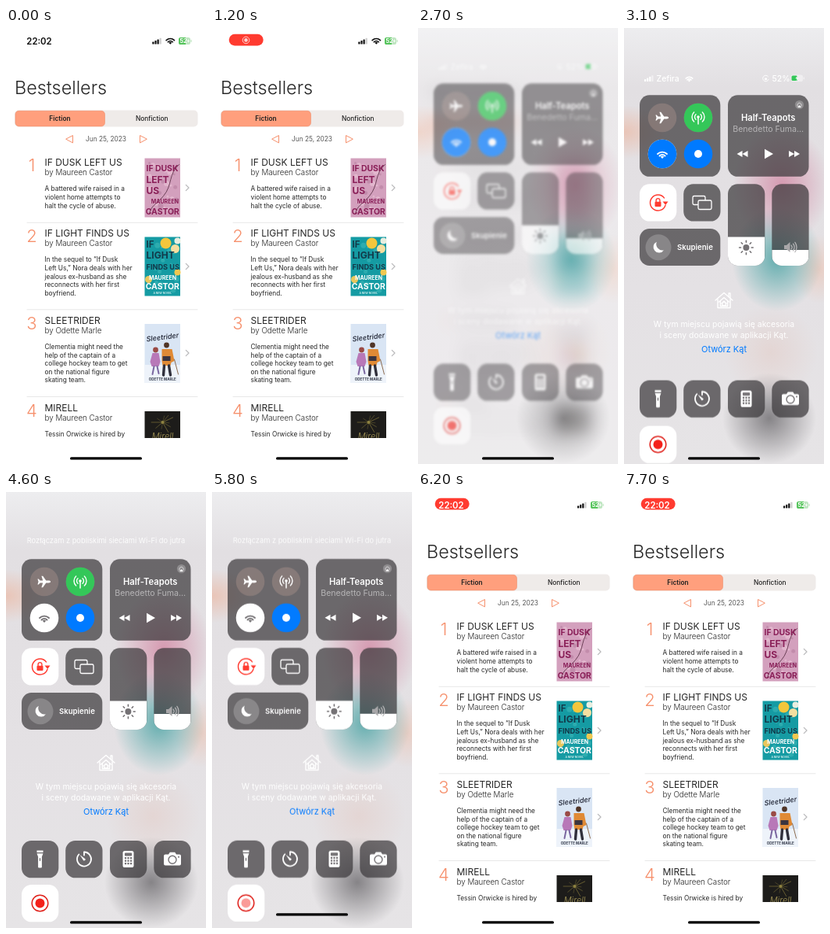
Write an HTML page that moves like this. It is 256x554 px and loops after 8 s.

```html
<!DOCTYPE html>
<html lang="en">
<head>
<meta charset="utf-8">
<title>Bestsellers</title>
<style>
html, body { margin: 0; width: 100%; height: 100%; overflow: hidden; background: #fff; }
svg, #backdrop { position: absolute; left: 0; top: 0; width: 256px; height: 554px; }
svg { font-family: Inter, Roboto, sans-serif; overflow: hidden; }
#backdrop {
  opacity: 0;
  background:
    radial-gradient(ellipse 55px 34px at 0 132px, rgba(240,170,140,.5), transparent),
    radial-gradient(ellipse 62px 75px at 202px 200px, rgba(205,110,145,.62), transparent),
    radial-gradient(ellipse 58px 66px at 196px 294px, rgba(40,150,150,.68), transparent),
    radial-gradient(ellipse 34px 44px at 250px 306px, rgba(236,190,170,.55), transparent),
    radial-gradient(ellipse 60px 60px at 188px 412px, rgba(225,190,180,.35), transparent),
    radial-gradient(ellipse 60px 58px at 186px 496px, rgba(70,68,72,.6), transparent),
    linear-gradient(#ededef, #e2dfe2 75px, #e4e1e4 330px, #e6e4e6);
}
</style>
</head>
<body>
<svg id="page" viewBox="0 0 256 554"></svg>
<div id="backdrop"></div>
<svg id="panel" viewBox="0 0 256 554"></svg>
<svg id="bar" viewBox="0 0 256 554"></svg>
<script>
const $ = id => document.getElementById(id);
const text = (x, y, s, size, weight = 400, fill = '#222', anchor = 'start', more = '') =>
  `<text x="${x}" y="${y}" font-size="${size}" font-weight="${weight}" fill="${fill}" text-anchor="${anchor}" ${more}>${s}</text>`;
const rect = (x, y, w, h, r, fill, more = '') =>
  `<rect x="${x}" y="${y}" width="${w}" height="${h}" rx="${r}" fill="${fill}" ${more}/>`;
const dot = (x, y, r, fill, more = '') => `<circle cx="${x}" cy="${y}" r="${r}" fill="${fill}" ${more}/>`;
const line = (d, color, w = 1, more = '') =>
  `<path d="${d}" fill="none" stroke="${color}" stroke-width="${w}" stroke-linecap="round" stroke-linejoin="round" ${more}/>`;
const shape = (d, fill) => `<path d="${d}" fill="${fill}"/>`;
const at = (x, y, s, k = 1) => `<g transform="translate(${x} ${y}) scale(${k})">${s}</g>`;
const group = (id, s, more = '') => `<g id="${id}" ${more}>${s}</g>`;
const arc = (r, from, to) => {
  const p = a => [r * Math.cos(a * Math.PI / 180), r * Math.sin(a * Math.PI / 180)].map(v => v.toFixed(2)).join(' ');
  return `M${p(from)}A${r} ${r} 0 ${to - from > 180 ? 1 : 0} 1 ${p(to)}`;
};

// Small icons
const bars = (x, y, on, off) => [0, 1, 2, 3].map(i =>
  rect(x + i * 3.1, y - 3 - i * 1.6, 2.2, 3 + i * 1.6, .6, i < 3 ? on : off)).join('');
const wifi = (x, y, fill, k = 1) => at(x, y,
  shape('M0 0L-2 -2.1A3 3 0 0 1 2 -2.1Z', fill) +
  [4.3, 7.3].map(r => line(arc(r, -135, -45), fill, 1.7, 'stroke-linecap="butt"')).join(''), k);
const bolt = (x, y, fill) => at(x, y, shape('M1 -3.4L-2 .5H0L-.8 3.4L2.2 -.6H.2Z', fill));
const battery = (x, y) =>
  rect(x, y, 15, 9, 2.6, '#bfe6c1') + shape(`M${x + 2.6} ${y}h6.4v9h-6.4a2.6 2.6 0 0 1-2.6-2.6v-3.8a2.6 2.6 0 0 1 2.6-2.6z`, '#55c45b') +
  rect(x + 15.5, y + 3, 1.2, 3, .6, '#bfe6c1') +
  text(x + 1.5, y + 7.1, '52', 7.4, 700, '#fff') + at(x + 12.3, y + 4.5, bolt(0, 0, '#fff'), .8);

// Book list
const INK = '#262626', PEACH = '#f6906c';
const books = [
  { y: 165, name: 'IF DUSK LEFT US', by: 'Maureen Castor',
    about: ['A battered wife raised in a', 'violent home attempts to', 'halt the cycle of abuse.'] },
  { y: 255, name: 'IF LIGHT FINDS US', by: 'Maureen Castor',
    about: ['In the sequel to “If Dusk', 'Left Us,” Nora deals with her', 'jealous ex-husband as she', 'reconnects with her first', 'boyfriend.'] },
  { y: 365.5, name: 'SLEETRIDER', by: 'Odette Marle',
    about: ['Clementia might need the', 'help of the captain of a', 'college hockey team to get', 'on the national figure', 'skating team.'] },
  { y: 476.5, name: 'MIRELL', by: 'Maureen Castor', about: ['Tessin Orwicke is hired by'] },
];
const row = ({ y, name, by, about }, i) =>
  text(33, y + 17, i + 1, 22, 300, PEACH, 'middle') +
  text(49.5, y + 10, name, 12, 400, INK) +
  text(49.5, y + 22.3, 'by ' + by, 9.8, 300, INK) +
  about.map((s, n) => text(49.5, y + 42.4 + n * 10.6, s, 8.3, 400, INK)).join('');

const PLUM = '#8a1f58', NAVY = '#123a4a';
const petals = (n, fill) => Array.from({ length: n }, (_, i) =>
  dot(6 + (i * 17.3) % 36, 6 + (i * 23.7) % 64, 1.5 + i % 3, fill, 'opacity=".55"')).join('');
const covers =
  at(177.5, 165.5,
    rect(0, 0, 45.5, 75, 0, '#d3a0bd') + petals(26, '#efc9da') + petals(9, '#a86a90') +
    line('M44 8C30 20 36 34 24 48S10 58 6 70', '#6d4258', 1) +
    text(2, 16, 'IF DUSK', 10.4, 700, PLUM) + text(2, 31, 'LEFT', 12, 700, PLUM) + text(2, 45, 'US', 12, 700, PLUM) +
    text(43.5, 57, 'MAUREEN', 7, 700, PLUM, 'end') + text(22.8, 71, 'CASTOR', 10.4, 700, PLUM, 'middle')) +
  at(177.5, 265.5,
    rect(0, 0, 45.5, 75, 0, '#159ba3') + petals(16, '#42b9ba') +
    dot(27, 8, 7, '#f3c63c') + dot(39, 15, 5.5, '#f5dfa0') + dot(42, 5, 4, '#e8eee0') + dot(5, 54, 4.5, '#e9c75c') + dot(42, 45, 4, '#f0c850') +
    text(2, 13, 'IF', 11.5, 700, NAVY) + text(2, 27.5, 'LIGHT', 12, 700, NAVY) + text(2, 41, 'FINDS US', 9.2, 700, NAVY) +
    text(23, 54, 'MAUREEN', 7, 700, '#fff', 'middle') + text(22.8, 66, 'CASTOR', 10.4, 700, '#fff', 'middle') +
    text(22.8, 72.5, 'A NEW NOVEL', 3.4, 600, '#d5f0ef', 'middle')) +
  at(177.5, 376,
    rect(0, 0, 45.5, 75, 0, '#d9e5f4') + rect(0, 52, 45.5, 23, 0, '#eef3fa') +
    dot(14, 33, 3.4, '#9a4a45') + shape('M10 37h8l2 11-2 6h-9l-2-6z', '#b878b8') + line('M12 54l-2 10M16 54l2 9', '#7a67a0', 2) +
    dot(28, 27, 3.4, '#503527') + shape('M22 32h13l3 15-4 2-1 4h-10l-1-6z', '#e08a35') + rect(23, 41, 10, 6, 0, '#3b3540') + line('M25 53l-1 12M31 53l2 12', '#30303c', 3.4) +
    line('M38 45L43 64', '#8b6a4f', 1) +
    text(23, 20, 'Sleetrider', 9, 500, '#1c2030', 'middle', 'font-style="italic" transform="rotate(-7 23 18)"') +
    text(22.8, 72, 'ODETTE MARLE', 4.5, 700, '#333a4a', 'middle')) +
  at(177.5, 487,
    rect(0, 0, 45.5, 75, 0, '#1d1c1a') +
    [-75, -50, -25, 5, 30, 60, 100, 140, 180, 215].map((a, i) =>
      line('M0 0L12 0', '#6d6334', .7, `transform="translate(23 14) rotate(${a}) scale(${.7 + i % 3 * .25})"`)).join('') +
    dot(23, 14, 2, '#8e8241') + text(23, 36, 'Mirell', 11, 300, '#a99a58', 'middle', 'font-style="italic"'));

$('page').innerHTML =
  '<clipPath id="view"><rect y="150" width="256" height="371"/></clipPath>' + rect(0, 0, 256, 554, 0, '#fff') +
  text(11, 84, 'Bestsellers', 23.4, 300, INK) +
  rect(11, 104.5, 234.5, 21, 5, '#efebe9') + rect(12, 105.3, 114.5, 19.6, 4.5, '#ff9f7d', 'stroke="#ee8e6c" stroke-width=".6"') +
  text(69, 118, 'Fiction', 8.4, 600, '#222', 'middle') + text(186.7, 118, 'Nonfiction', 8.4, 500, '#222', 'middle') +
  line('M77 141L85.5 136.5V145.5Z', PEACH) + line('M180 141L171.5 136.5V145.5Z', PEACH) +
  text(128, 144, 'Jun 25, 2023', 8.3, 400, '#555', 'middle') +
  `<g clip-path="url(#view)">${books.map(row).join('')}${covers}</g>` +
  [247.3, 357.8, 468.5].map(y => line(`M27 ${y}H245`, '#dedede', .7)).join('') +
  [203, 303, 413].map(y => line(`M230.3 ${y - 3.7}L234 ${y}L230.3 ${y + 3.7}`, '#b9b9bb', 1.2)).join('');

// Control panel
const TILE = 'rgba(60,57,60,.72)', W = '#fff', GREY = '#747174', RED = '#ff3b30', BLUE = '#007aff';
const tile = (x, y, w = 47.3, h = 47.3, fill = TILE) => rect(x, y, w, h, 12.5, fill);
const plane = shape('M9 0C9-1 8-1.6 6-1.6H2.5L-2-8h-2l2 6.4h-4l-2-2.4h-1.5l1.2 4-1.2 4H-8l2-2.4h4l-2 6.4h2l4.5-6.4H6c2 0 3-.6 3-1.6z', W);
const antenna = dot(0, -1, 1.8, W) + line('M0 0V8', W, 1.5) +
  [4.5, 8].map(r => at(0, -1, line(arc(r, -48, 48), W, 1.4) + line(arc(r, 132, 228), W, 1.4))).join('');
const skip = shape('M-7 -4L0 0L-7 4ZM0 -4L7 0L0 4Z', W);

const top_ = tile(20, 85.3, 103.3, 103.5) + tile(133, 85.3, 103.5, 103.5) +
  dot(49, 114, 18.3, 'rgba(190,160,150,.32)') + at(49, 114, plane, .9) +
  dot(95, 114, 18.3, 'rgba(190,160,150,.32)') + group('cell', dot(95, 114, 18.3, '#34c759')) + at(95, 114, antenna) +
  dot(49, 160, 18.3, W) + wifi(49, 166, GREY, 1.15) +
  group('wifiOn', dot(49, 160, 18.3, BLUE) + wifi(49, 166, W, 1.15)) +
  dot(95, 160, 18.3, BLUE) + dot(95, 160, 5, W) +
  dot(224.5, 97.5, 5.6, 'rgba(255,255,255,.25)') +
  at(224.5, 98, line(arc(3, 150, 390), W, .7) + shape('M0 0L2.6 3.4H-2.6Z', W), .9) +
  text(184.7, 118, 'Half-Teapots', 11.2, 600, W, 'middle') +
  text(184.7, 132, 'Benedetto Fuma...', 10.6, 400, 'rgba(255,255,255,.5)', 'middle') +
  at(151.5, 160, skip, -1) + shape('M180 153.7L191 160L180 166.3Z', W) + at(218, 160, skip);

const sun = dot(0, 0, 4, GREY) + [0, 45, 90, 135, 180, 225, 270, 315].map(a =>
  line('M6.8 0H8.8', GREY, 1.6, `transform="rotate(${a})"`)).join('');
const slider = (x, y, id) => `<clipPath id="${id}">${rect(x, 198.3, 47.3, 103.7, 12.5, W)}</clipPath>` +
  tile(x, 198.3, 47.3, 103.7) + rect(x, y, 47.3, 302 - y, 0, W, `clip-path="url(#${id})"`);
const mid = tile(20, 198.3, 47.3, 47.3, W) +
  at(43.5, 222, line(arc(10, 20, 322), RED, 1.5) + shape('M6 -1.5H13L9.7 3Z', RED) +
    rect(-4, -1.2, 8, 6.2, 1, RED) + line('M-2.4 -1V-3A2.4 2.4 0 0 1 2.4 -3V-1', RED, 1.4)) +
  tile(76.2, 198.3) + rect(88, 213.5, 16, 11, 1.8, 'none', 'stroke="#fff" stroke-width="1.3"') +
  rect(95, 219, 17, 11.5, 1.8, '#6c696c', 'stroke="#fff" stroke-width="1.3"') +
  slider(133, 265.5, 'cutA') + at(156.4, 279, sun) +
  slider(189.3, 282, 'cutB') + at(211, 278.5, shape('M-6 -2.6H-3L1.5 -6.5V6.5L-3 2.6H-6Z', '#a9a7a9') +
    [4, 7, 10].map(r => line(arc(r, -38, 38), '#b7b5b7', 1.3)).join('')) +
  tile(20, 255, 103.3, 47) + dot(44, 278.7, 16.5, 'rgba(255,255,255,.2)') +
  shape('M41.8 271.7A7.3 7.3 0 1 0 51 282.3A8 8 0 0 1 41.8 271.7Z', W) +
  text(68, 282.3, 'Skupienie', 9.6, 600, W);

const house = k => line('M-11 0L0 -9.5L11 0', W, 1.4 / k) + line('M-8 -1V9.5H8V-1', W, 1.4 / k);
const home = at(128, 344, house(1) + line('M6 -5V-9H8V-3', W, 1.3) + at(0, 2, house(.58), .58) + at(0, 4, house(.28), .28)) +
  text(128, 377.7, 'W tym miejscu pojawią się akcesoria', 10.4, 400, W, 'middle') +
  text(128, 391.7, 'i sceny dodawane w aplikacji Kąt.', 10.4, 400, W, 'middle') +
  text(128, 410.4, 'Otwórz Kąt', 11, 400, BLUE, 'middle');

const keys = [0, 1, 2].flatMap(c => [0, 1, 2].map(r => rect(-4.6 + c * 3.5, -2.4 + r * 3.5, 2.2, 2.2, .5, GREY))).join('');
const buttons = [20, 76.2, 133, 189.3].map(x => tile(x, 443)).join('') +
  at(43.5, 466.5, shape('M-4 -11H4V-8.5H-4ZM-4 -7.3H4L2.4 -3V10Q2.4 11 1.4 11H-1.4Q-2.4 11 -2.4 10V-3Z', W) + rect(-.7, -1.5, 1.4, 4, .7, GREY)) +
  at(100, 466.5, line(arc(9, -88, 222), W, 1.8) + line('M0 -9V-5', W, 1.8) + shape('M-5.5 -5.5L1.7 0A1.7 1.7 0 0 1 -.8 1.7Z', W)) +
  at(156.5, 466.5, rect(-7, -10.5, 14, 21, 2.6, W) + rect(-4.6, -8, 9.2, 4, 1, GREY) + keys) +
  at(213, 466.5, shape('M-9 -6H-5L-3.2 -8.8H3.2L5 -6H9Q11 -6 11 -4V6Q11 8 9 8H-9Q-11 8 -11 6V-4Q-11 -6 -9 -6Z', W) +
    dot(0, .8, 5, 'none', `stroke="${GREY}" stroke-width="1.4"`) + dot(8, -2.8, 1, GREY));
const record = tile(20, 499, 47.3, 47.3, W) +
  dot(43.5, 522.5, 10.3, 'none', 'stroke="#e0231d" stroke-width="1.5"') + group('pulse', dot(43.5, 522.5, 6, '#f4211b'));

const carrier = bars(26, 68, 'rgba(255,255,255,.95)', 'rgba(255,255,255,.5)') + text(41.5, 68, 'Zefira', 10.4, 500, W) + wifi(83.5, 68.5, W, .85) +
  at(181.5, 64, line(arc(3.8, 20, 325), W, .9) + rect(-1.5, -.6, 3, 2.6, .4, W)) +
  text(189.5, 68, '52%', 10.4, 500, W) +
  rect(213.5, 59.5, 15.5, 8.6, 2.6, 'rgba(255,255,255,.45)') + rect(214.5, 60.5, 7.6, 6.6, 1.6, '#34c759') +
  rect(229.7, 62.3, 1.2, 3, .6, 'rgba(255,255,255,.6)') + bolt(221.3, 63.8, W);

$('panel').innerHTML = group('cc',
  group('top', top_) + group('rest',
    group('carrier', carrier) +
    group('message', text(128, 65.2, 'Rozłączam z pobliskimi sieciami Wi-Fi do jutra', 9.3, 400, 'rgba(255,255,255,.9)', 'middle')) +
    group('mid', mid) + group('home', home) + group('buttons', buttons) + group('record', record)));

// Status bar and home indicator
const clock = fill => text(42.5, 20.6, '22:02', 11.4, 600, fill, 'middle');
$('bar').innerHTML =
  group('before', bars(187.3, 20.6, '#111', '#ccc') + wifi(210.3, 20.8, '#111') + battery(221, 12)) +
  group('after', bars(204, 20.6, '#111', '#ccc') + battery(221, 12)) +
  group('time', clock('#111')) +
  group('pill', rect(21.7, 7.8, 44, 14.6, 7.3, RED) +
    group('icon', dot(43.5, 15.4, 4.3, 'none', 'stroke="#fff" stroke-width="1"') + dot(43.5, 15.4, 2.3, W)) +
    group('lit', clock(W))) +
  group('swipe', rect(82, 545.3, 92, 3.2, 1.6, '#000'));

const LOOP = 8000;
function anim(id, prop, steps, easing = 'ease-out') {
  const all = [[0, steps[0][1]], ...steps, [LOOP, steps[steps.length - 1][1]]];
  $(id).animate(all.map(([t, v]) => ({ offset: t / LOOP, [prop]: v, easing })), { duration: LOOP, iterations: Infinity });
}
const fade = (id, ...steps) => anim(id, 'opacity', steps, 'linear');
const moveY = (id, ...steps) => anim(id, 'transform', steps.map(([t, y]) => [t, `translateY(${y}px)`]));
const blur = (id, ...steps) => anim(id, 'filter', steps.map(([t, r]) => [t, `blur(${r}px)`]), 'linear');

// Recording pill
fade('time', [100, 1], [400, 0]);
fade('pill', [100, 0], [400, 1], [2450, 1], [2700, 0], [5950, 0], [6150, 1]);
fade('icon', [500, 0], [900, .6], [1600, 1], [3000, 1], [3001, 0]);
fade('lit', [3000, 0], [3001, 1]);
fade('before', [2400, 1], [2650, 0]);
anim('before', 'transform', [[2200, 'translate(0px,0px)'], [2400, 'translate(2px,3px)'], [2650, 'translate(3px,20px)']]);
fade('after', [5950, 0], [6150, 1]);

// Opening and closing
blur('page', [2200, 0], [2400, .8], [2600, 5], [2800, 14], [5800, 14], [5950, 6], [6130, 0]);
fade('page', [2200, 1], [2400, .75], [2600, .6], [5850, .6], [6150, 1]);
anim('page', 'transform', [[2200, 'scale(1)'], [2400, 'scale(.993)'], [2800, 'scale(.97)'], [5800, 'scale(.97)'], [6150, 'scale(1)']]);
fade('backdrop', [2300, 0], [2400, .03], [2600, .5], [2850, 1], [5800, 1], [5950, .5], [6120, 0]);
fade('cc', [2250, 0], [2400, .06], [2600, .5], [2850, 1], [5800, 1], [5950, .4], [6100, 0]);
moveY('top', [2200, -160], [2400, -130], [2600, -35], [2850, 0], [5800, 0], [6100, -40]);
moveY('rest', [2400, -70], [2600, -35], [2850, 0], [5800, 0], [6100, -50]);
fade('rest', [2420, 0], [2750, 1]);
blur('cc', [2400, 7], [2600, 3], [2800, 0], [5800, 0], [6100, 6]);
[['home', 2], ['buttons', 4.6], ['record', 6.6]].forEach(([id, d]) =>
  moveY(id, [2500, -d * 3], [2950, d * 1.2], [3100, d], [3700, 0]));
moveY('swipe', [5500, 0], [5800, -10], [5900, -10], [6150, 0]);

// Switches
fade('wifiOn', [4000, 1], [4200, 0]);
fade('carrier', [4000, 1], [4250, 0]);
fade('message', [4150, 0], [4500, 1]);
fade('cell', [4900, 1], [5150, 0]);
fade('pulse', [3400, 1], [3800, .45], [4200, .45], [4600, 1], [4900, 1], [5300, .45]);
</script>
</body>
</html>
```
